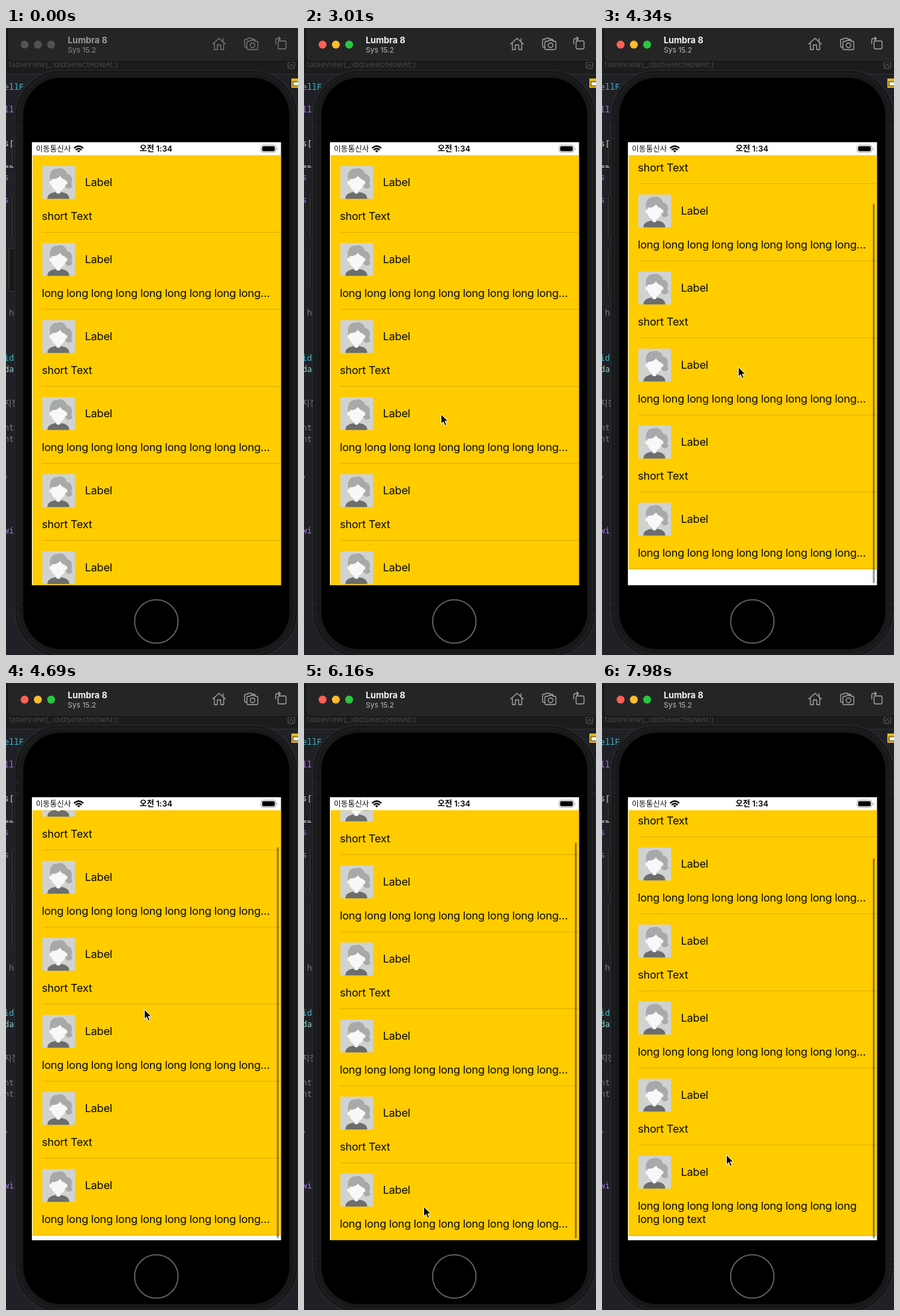
Animation, 440 px wide and 944 px high, one loop 8 s. Source, as an HTML page:

```html
<!DOCTYPE html>
<html lang="ko">
<head>
<meta charset="utf-8">
<style>
  html, body { margin: 0; width: 100%; height: 100%; overflow: hidden; background: #202126; }
  svg { display: block; width: 440px; height: 944px; }
  text { white-space: pre; }
  .ui { font-family: Inter, "Noto Sans CJK KR", "Noto Sans CJK", sans-serif; }
  .row { font-size: 16.5px; letter-spacing: -0.26px; fill: #0a0900; }
  .code { font: 12.5px "Noto Sans Mono", "Noto Sans CJK KR", monospace; }
  .line { fill: none; stroke-linejoin: round; stroke-linecap: round; stroke-width: 1.3; }
</style>
</head>
<body>
<svg viewBox="0 0 440 944" class="ui">
  <defs>
    <clipPath id="list"><rect x="39" y="191.600" width="375.400" height="647.400"/></clipPath>
    <clipPath id="photo"><rect width="50" height="50" rx="1.500"/></clipPath>
    <g id="avatar" clip-path="url(#photo)">
      <rect width="50" height="50" fill="#d0d2d2"/>
      <path d="M35 12Q44 12 45 20Q45.500 23 44 26Q44 29 46 31Q42 36 37 33.500Q33 28 35 12Z" fill="#a7a9aa"/>
      <path d="M12.500 25C9.500 11 15 4 23 4.500C28 1.500 37 6 37.500 13Q38 20 36.500 25Z" fill="#a7a9aa"/>
      <g fill="#f8f8f8">
        <ellipse cx="13" cy="25.500" rx="2" ry="2.800"/><ellipse cx="36" cy="25.500" rx="2" ry="2.800"/>
        <path d="M14 20Q23 20.500 27 15Q30 20 35 21V27C35 33 29 38.500 24.500 38.500C20 38.500 14 33 14 27Z"/>
        <path d="M21.500 35H27.500V41Q24.500 45 21.500 41Z"/>
      </g>
      <path d="M8 50C8 43.500 12 41 20.500 39.500Q24.500 44.500 28.500 39.500C37 41 41 43.500 41 50Z" fill="#6c6d6e"/>
    </g>
  </defs>

  <rect width="440" height="944" fill="#202126"/>
  <rect width="440" height="69" fill="#1c1c1d"/>
  <path d="M0 69.500H440" stroke="#333335"/>
  <text x="4" y="59" font-size="12" fill="#454547">tableView(_:didSelectRowAt:)</text>
  <g id="code" class="code"></g>
  <rect x="425" y="51" width="10" height="10" rx="2" fill="none" stroke="#626264"/>
  <path d="M427 59L430 54L433 59" fill="none" stroke="#626264"/>
  <rect x="430" y="76" width="10" height="14" fill="#e5b91e"/>
  <rect x="432.500" y="81" width="9" height="6" fill="#fff" stroke="#37300f"/>

  <g fill="#18191b" stroke="#3b3b3d">
    <rect x="9.500" y="177.500" width="9" height="32" rx="3"/>
    <rect x="9.500" y="250.500" width="9" height="66" rx="3"/>
    <rect id="volume" x="9.500" y="331.500" width="14" height="65" rx="3"/>
  </g>
  <rect x="13.500" y="63.500" width="426" height="884" rx="69" fill="#17181a" stroke="#2b2c2e" stroke-width="1.200"/>
  <rect x="18.500" y="68.500" width="416" height="874" rx="64" fill="none" stroke="#1e1f21" stroke-width="2"/>
  <path d="M14 150H20M14 166H20M14 867H20M14 883H20M433 150H439M433 166H439M433 867H439M433 883H439" stroke="#2b2c2e"/>
  <rect x="26" y="75" width="401" height="860" rx="57"/>
  <circle cx="226.500" cy="893.500" r="32.700" fill="none" stroke="#626264" stroke-width="1.800"/>

  <path d="M2 0H440V51H12Q2 51 2 41Z" fill="#252526"/>
  <path d="M2.500 0V41Q2.500 50.500 12 50.500H440" fill="none" stroke="#111"/>
  <g id="lights"></g>
  <text id="title" x="93" y="23" font-size="13" font-weight="700">Lumbra 8</text>
  <text id="system" x="93" y="37" font-size="11">Sys 15.2</text>
  <g id="tools" class="line">
    <path d="M311.500 24L321 15.500L330.500 24M314 22.500V32.500H318.500V25.500H323.500V32.500H328V22.500M327 20V16"/>
    <path d="M362.500 29H361Q359.500 29 359.500 27V18.500Q359.500 17 361 17H363L364.500 15.500H370L371.500 17H374Q375.500 17 375.500 19"/>
    <path d="M364.500 20H367.500L369 18.500H374L375.500 20H378Q379.500 20 379.500 21.500V31Q379.500 32.500 378 32.500H364.500Q363 32.500 363 31V21.500Q363 20 364.500 20Z"/>
    <circle cx="371.500" cy="26" r="3.500"/>
    <rect x="410" y="19.500" width="12" height="12" rx="2"/>
    <path d="M406.500 24V18Q406.500 16 408.500 16H413M411 13.500L413.500 16L411 18.500"/>
  </g>

  <rect x="39" y="172" width="375.400" height="667" fill="#fff"/>
  <text x="45" y="186" font-size="11.500" fill="#111">이동통신사</text>
  <g fill="none" stroke="#000" stroke-width="2.200">
    <path d="M102.500 181Q109.500 174.500 116.500 181M105 183.600Q109.500 179.500 114 183.600"/>
    <path d="M109.500 187.500L107.200 185Q109.500 183.200 111.800 185Z" fill="#000" stroke="none"/>
  </g>
  <text x="226" y="186" font-size="12" font-weight="600" text-anchor="middle">오전 1:34</text>
  <rect x="384.500" y="176.500" width="22" height="10.500" rx="3" fill="none" stroke="#999"/>
  <rect x="386" y="178" width="19" height="7.500" rx="1.800"/>
  <path d="M408 180Q410 182 408 184Z" fill="#999"/>

  <g id="rows" clip-path="url(#list)"></g>
  <rect id="bar" x="408" width="3" rx="1.500" fill="#000" fill-opacity=".38"/>
  <path id="cursor" d="M0 0V14.500L3.400 11.300L5.800 17L8.300 16L5.900 10.500H10.500Z" fill="#000" stroke="#fff" stroke-width="1"/>
</svg>
<script>
const LOOP = 8000, STEP = 70, ROWS = 6, ROW_H = 116, EXTRA = 20.5;
const TOP = 192, VIEW = 647, LEFT = 40, RIGHT = 414.4, FOCUS = 980;
const $ = id => document.getElementById(id);

function add(parent, tag, attrs, content) {
  const el = document.createElementNS("http://www.w3.org/2000/svg", tag);
  for (const key in attrs) el.setAttribute(key, attrs[key]);
  if (content) el.textContent = content;
  parent.appendChild(el);
  return el;
}

const cyan = "#43b7cb", purple = "#a875da", pale = "#d8d8da", grey = "#77797d";
[["ellF", 93, cyan], ["ll", 127, purple], ["s[", 178, pale], ["==", 213, pale],
 ["s", 229, purple], ["s", 263, purple], [" h", 433, grey], ["id", 501, cyan],
 ["da", 518, "#94d5cc"], ["지정", 570, grey], ["nt", 606, grey], ["nt", 623, grey],
 [",", 676, grey], ["wi", 761, purple]
].forEach(([word, y, fill]) => add($("code"), "text", { x: -3, y, fill }, word));

const lights = ["#ff5f57", "#febc2e", "#28c840"].map((color, i) =>
  ({ color, el: add($("lights"), "circle", { cx: 28 + 20 * i, cy: 25, r: 6 }) }));

const LONG = Array(9).fill("long").join(" ");
const rows = Array.from({ length: ROWS }, (_, i) => {
  const el = add($("rows"), "g", { class: "row" });
  const back = add(el, "rect", { x: LEFT, y: i ? 0 : -1, width: RIGHT - LEFT, fill: "#ffcc00" });
  add(el, "use", { href: "#avatar", x: 54.4, y: 15.4 });
  add(el, "text", { x: 119, y: 46.3 }, "Label");
  const first = add(el, "text", { x: 54, y: 97 }, "short Text");
  const second = add(el, "text", { x: 54, y: 117.4 }, "long long text");
  const edge = i === ROWS - 1 ? LEFT : 55;
  const rule = add(el, "rect", { x: edge, width: RIGHT - edge, height: 1, fill: "#000", "fill-opacity": .14 });
  return { el, back, first, second, rule, long: i % 2 === 1 };
});

// Key lists hold [time, value, ...]
const pointer = [
  [70, -8, 355], [770, 180, 271], [1260, 180, 271], [1750, 213, 348], [2450, 213, 348],
  [3010, 206, 581], [3500, 206, 581], [3850, 201, 600], [3990, 201, 600], [4060, 201, 594],
  [4340, 205, 510], [4690, 208, 491], [5180, 206, 588], [5320, 206, 588], [5460, 180, 788],
  [6720, 180, 788], [7000, 184, 743], [7770, 184, 743], [7980, 187, 710]
];
const scroll = [
  [3990, 0], [4060, 6], [4200, 49], [4340, 73], [4480, 73], [4690, 56], [4830, 51.5], [5180, 49],
  [6720, 49], [7000, 71], [7140, 71], [7280, 55], [7420, 49], [7770, 49], [7980, 76]
];
const openings = [[1, 1820, 2170], [3, 3150, 3570], [5, 5390, 6160], [5, 7560, LOOP]];

function sample(keys, t) {
  if (t <= keys[0][0]) return keys[0].slice(1);
  const next = keys.findIndex(key => key[0] > t);
  if (next < 0) return keys[keys.length - 1].slice(1);
  const a = keys[next - 1], b = keys[next], p = (t - a[0]) / (b[0] - a[0]);
  return a.slice(1).map((v, i) => v + (b[i + 1] - v) * p);
}

function drawRows(t, offset) {
  let y = 0;
  rows.forEach((row, i) => {
    const open = openings.some(([index, from, to]) => index === i && t >= from && t < to);
    const height = ROW_H + (open ? EXTRA : 0);
    row.el.setAttribute("transform", `translate(0 ${TOP + y - offset})`);
    row.back.setAttribute("height", height + (i ? 0 : 1));
    row.rule.setAttribute("y", height - 1);
    row.second.setAttribute("visibility", open ? "visible" : "hidden");
    if (row.long) row.first.textContent = open ? LONG : LONG + "…";
    y += height;
  });
  return y;
}

function drawBar(t, offset, total) {
  const scale = 641 / total, over = Math.max(0, offset - (total - VIEW));
  const top = 195 + (offset - over) * scale + over;
  const bottom = Math.min(836, top + VIEW * scale);
  $("bar").setAttribute("y", top);
  $("bar").setAttribute("height", bottom - top);
  $("bar").setAttribute("visibility", t >= 4060 ? "visible" : "hidden");
}

function draw(time) {
  const t = Math.floor(time / STEP) * STEP;
  const active = t >= FOCUS;
  lights.forEach(({ el, color }) => el.setAttribute("fill", active ? color : "#535354"));
  $("title").setAttribute("fill", active ? "#f4f4f4" : "#9b9b9c");
  $("system").setAttribute("fill", active ? "#b8b8b9" : "#8b8b8c");
  $("tools").setAttribute("stroke", active ? "#a5a5a6" : "#78787a");
  $("volume").setAttribute("x", t < 1330 ? 4.5 : 9.5);

  const [offset] = sample(scroll, t);
  drawBar(t, offset, drawRows(t, offset));

  const [x, y] = sample(pointer, t);
  $("cursor").setAttribute("transform", `translate(${x + .5} ${y + .5})`);
  $("cursor").setAttribute("visibility", t >= 70 ? "visible" : "hidden");
}

const start = performance.now();
function tick() {
  draw((performance.now() - start) % LOOP);
  requestAnimationFrame(tick);
}
tick();
</script>
</body>
</html>
```
